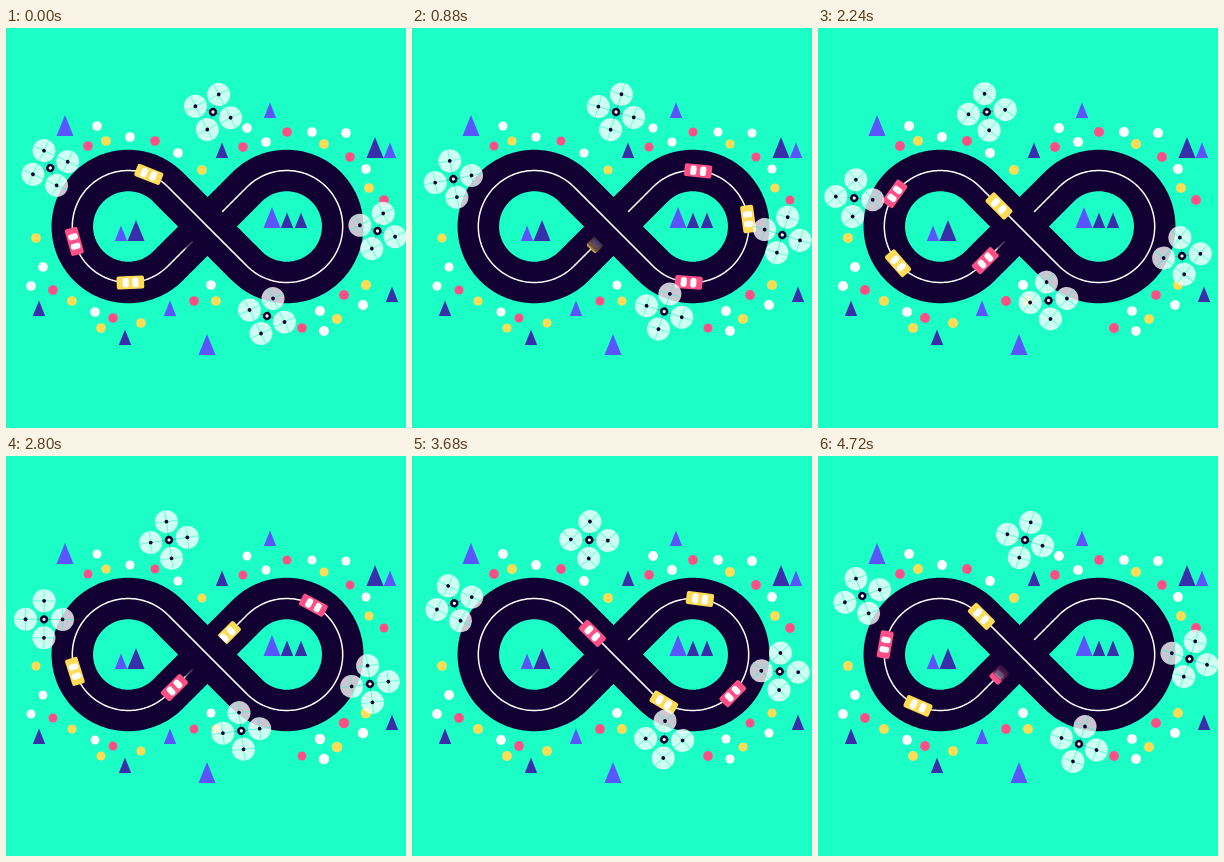
These frames come from a looping animation (400 by 400 pixels, 4.8 s). An HTML page with a canvas:

```html
<!DOCTYPE html>
<html lang="en">
<head>
<meta charset="utf-8">
<title>Infinity track</title>
<style>
  html, body { margin: 0; width: 100%; height: 100%; overflow: hidden; background: #1bffc6; }
  canvas { display: block; width: 400px; height: 400px; }
</style>
</head>
<body>
<canvas id="stage" width="400" height="400"></canvas>
<script>
const ctx = document.getElementById('stage').getContext('2d');
const { PI, sin, cos, atan2, SQRT2 } = Math;
const LOOP = 4800, STEP = 80, LAP_TIME = 2400;
const MINT = '#1bffc6', ROAD = '#130032', WHITE = '#fff', RED = '#ff4f86',
      YELLOW = '#ffdc55', LIGHT = '#5a55ff', DARK = '#3a2fab';

// Track: two lobes of radius R joined by 45 degree diagonals through (CX, CY).
const CX = 201.5, CY = 198.5, R = 56, HALF = R * (1.5 * PI + 2), LAP = 2 * HALF;
const CARS = [[79, YELLOW], [203, RED], [278, YELLOW], [377.5, RED]];

const DOTS = {
  [WHITE]: [91,98, 124,109, 172,125, 241,100, 260,114, 306,104, 340,105, 360,141,
            37,239, 25,258, 89,284, 205,257, 314,283, 318,303, 357,277],
  [RED]: [82,118, 149,113, 237,119, 281,104, 344,129, 378,172,
          47,262, 107,290, 188,273, 296,300, 338,267],
  [YELLOW]: [100,113, 196,142, 318,116, 363,160, 30,210, 66,273,
             95,300, 135,295, 210,273, 331,291, 360,257]
};

// Tip x, base y, half width, height per group.
const TREES = [
  [LIGHT, 8.5, 21, [59,108, 201,327, 266,200]],
  [DARK, 8.5, 21, [130,213, 369,130]],
  [LIGHT, 6.2, 15.5, [264,90, 384,130, 164,288, 115,213]],
  [DARK, 6.2, 15.5, [216,130, 33,288, 119,317, 386,274, 281,200, 295,200]]
];

// Each timing: leave, arrive, return, home.
const TILT = [650, 2450, 3100, 4480];
const DRONES = [
  { from: [207, 84], to: [163, 84], move: [500, 2780, 3065, 4655], tilt: [18, -8], turn: TILT },
  { from: [44.3, 140], to: [36, 171], move: [200, 1870, 1960, 4500], tilt: [-20, 5], turn: [200, 1870, 2400, 3800] },
  { from: [261, 288], to: [230.5, 272.5], move: [280, 1940, 2200, 4520], tilt: [19, -7], turn: TILT },
  { from: [371.5, 203], to: [364, 228], move: [390, 2265, 2843, 4517], tilt: [18, -7.5], turn: TILT }
];

const lerp = (a, b, k) => a + (b - a) * k;
const ease = (t, a, b) => 0.5 - 0.5 * cos(PI * Math.min(1, Math.max(0, (t - a) / (b - a))));
const swing = (t, [leave, arrive, back, home]) => ease(t, leave, arrive) - ease(t, back, home);

function pairs(list, draw) {
  for (let i = 0; i < list.length; i += 2) draw(list[i], list[i + 1]);
}

function disc(x, y, r, color) {
  ctx.fillStyle = color;
  ctx.beginPath();
  ctx.arc(x, y, r, 0, 2 * PI);
  ctx.fill();
}

function box(x, y, w, h, r, color) {
  ctx.fillStyle = color;
  ctx.beginPath();
  ctx.roundRect(x - w / 2, y - h / 2, w, h, r);
  ctx.fill();
}

function placed(x, y, angle, draw) {
  ctx.save();
  ctx.translate(x, y);
  ctx.rotate(angle);
  draw();
  ctx.restore();
}

function line(x1, y1, x2, y2, width, color) {
  ctx.lineWidth = width;
  ctx.strokeStyle = color;
  ctx.beginPath();
  ctx.moveTo(x1, y1);
  ctx.lineTo(x2, y2);
  ctx.stroke();
}

// Position and heading at distance s along the lap.
function trackPoint(s) {
  const side = s < HALF ? -1 : 1, u = s % HALF;
  let x, y, heading;
  if (u < R) {
    x = u / SQRT2; y = -x; heading = -PI / 4;
  } else if (u > HALF - R) {
    x = y = (HALF - u) / SQRT2; heading = -3 * PI / 4;
  } else {
    const a = (u - R) / R - 0.75 * PI;
    x = R * SQRT2 + R * cos(a); y = R * sin(a); heading = a + PI / 2;
  }
  return { x: CX + side * x, y: CY + y, angle: atan2(sin(heading), side * cos(heading)) };
}

const track = new Path2D();
for (let s = 0; s < LAP; s += 2) {
  const p = trackPoint(s);
  track.lineTo(p.x, p.y);
}
track.closePath();

function drawCar({ s, color }) {
  const p = trackPoint(s);
  placed(p.x, p.y, p.angle, () => {
    box(0, 0, 27.5, 13, 2, color);
    box(-4.7, 0, 6, 9.5, 2.5, WHITE);
    box(5, 0, 6, 9.5, 2.5, WHITE);
  });
}

function drawTrack(t) {
  ctx.lineWidth = 41.5;
  ctx.strokeStyle = ROAD;
  ctx.stroke(track);
  ctx.lineWidth = 1.5;
  ctx.strokeStyle = WHITE;
  ctx.stroke(track);

  const travelled = LAP * t / LAP_TIME + 3.2 * sin(PI * t / LAP_TIME) ** 2;
  const cars = CARS.map(([start, color]) => ({ s: (start + travelled) % LAP, color }));
  const isUnder = car => Math.abs(car.s - HALF) < R;
  cars.filter(isUnder).forEach(drawCar);

  // Shade and bridge over the crossing.
  placed(CX, CY, PI / 4, () => {
    const shade = ctx.createLinearGradient(0, 20, 0, 33);
    shade.addColorStop(0, 'rgba(19,0,50,.85)');
    shade.addColorStop(0.75, 'rgba(19,0,50,.6)');
    shade.addColorStop(1, 'rgba(19,0,50,0)');
    ctx.fillStyle = shade;
    ctx.fillRect(-12, 20, 24, 13);
    line(-R, 0, R, 0, 41.5, ROAD);
    line(-R, 0, R, 0, 1.5, WHITE);
  });
  cars.filter(car => !isUnder(car)).forEach(drawCar);
}

function drawDrone({ from, to, move, tilt, turn }, t) {
  const k = swing(t, move);
  const angle = lerp(...tilt, swing(t, turn)) * PI / 180;
  placed(lerp(from[0], to[0], k), lerp(from[1], to[1], k), angle, () => {
    for (let i = 0; i < 4; i++) {
      ctx.rotate(PI / 2);
      line(0, 0, 0, -18.5, 0.6, 'rgba(19,0,50,.4)');
      placed(0, -18.5, PI / 4 + t / STEP * PI / 4, () => {
        disc(0, 0, 11.5, 'rgba(255,255,255,.78)');
        line(-11.5, 0, 11.5, 0, 1, 'rgba(27,255,198,.55)');
        line(0, -11.5, 0, 11.5, 1, 'rgba(27,255,198,.55)');
        disc(0, 0, 1.9, ROAD);
      });
    }
    disc(0, 0, 4.2, ROAD);
    disc(0, 0, 1.6, WHITE);
  });
}

function drawScenery(t) {
  for (const color in DOTS) pairs(DOTS[color], (x, y) => {
    const peak = x > 300 && y > 250 ? 400 : 1800;
    disc(x, y, 4.8 + 0.4 * cos(2 * PI * (t - peak) / LAP_TIME), color);
  });
  for (const [color, half, height, spots] of TREES) pairs(spots, (x, y) => {
    ctx.fillStyle = color;
    ctx.beginPath();
    ctx.moveTo(x, y - height);
    ctx.lineTo(x + half, y);
    ctx.lineTo(x - half, y);
    ctx.fill();
  });
}

function frame() {
  const t = Math.floor(performance.now() % LOOP / STEP) * STEP;
  ctx.fillStyle = MINT;
  ctx.fillRect(0, 0, 400, 400);
  drawTrack(t);
  drawScenery(t);
  DRONES.forEach(drone => drawDrone(drone, t));
  requestAnimationFrame(frame);
}
frame();
</script>
</body>
</html>
```
